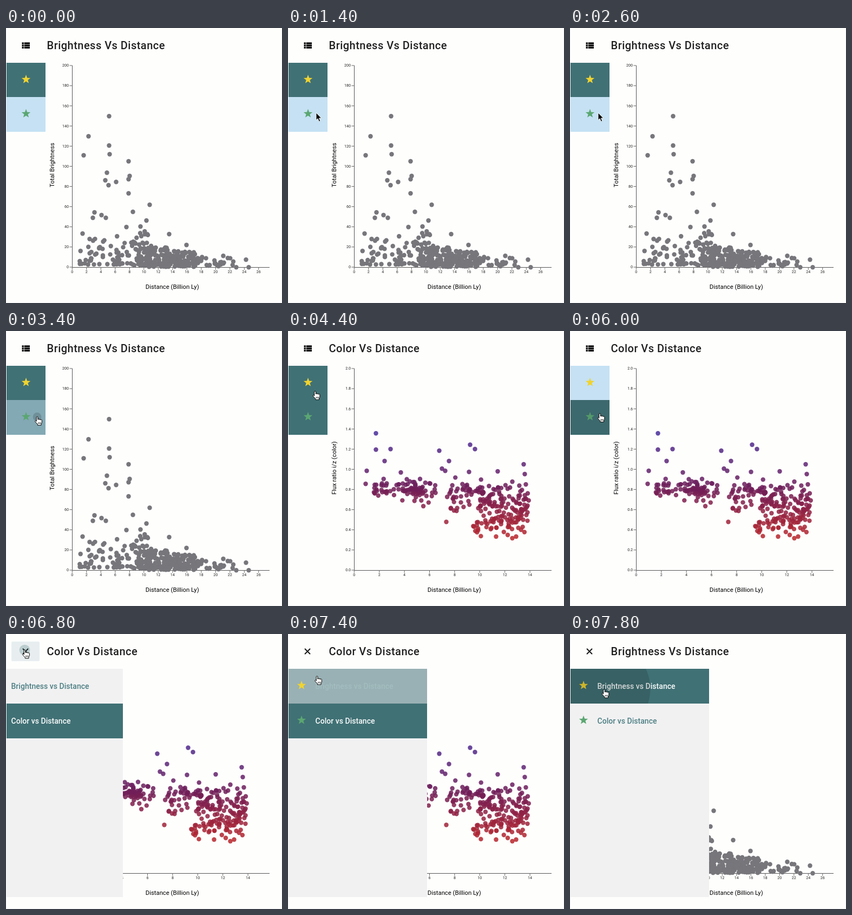
Write an HTML page that moves like this. It is 510x506 px and loops after 8 s.

```html
<!DOCTYPE html>
<html lang="en">
<head>
<meta charset="utf-8">
<title>Scatter charts</title>
<style>
  html, body { margin: 0; width: 100%; height: 100%; overflow: hidden; background: #fefefd; }
  #stage { display: block; font-family: Roboto, sans-serif; }
  .tick { font-size: 7.1px; fill: #222; }
  .label { font-size: 11.3px; fill: #000; }
  .title { font-size: 20px; font-weight: 500; letter-spacing: .47px; fill: #202020; }
  .row { font-size: 14px; font-weight: 500; letter-spacing: .03px; }
</style>
</head>
<body>
<svg id="stage" width="510" height="506" viewBox="0 0 510 506"></svg>
<script>
const LOOP = 8000, STEP = 200, FADE = 400, DRAWER_AT = 6660;
const TEAL = [64, 113, 117], SKY = [197, 225, 243], PANEL = [241, 241, 242];
const GOLD = '#f0d330', GREEN = '#5ba672';

const clamp = v => Math.min(1, Math.max(0, v));
const mix = (a, b, p) => a.map((v, i) => v + (b[i] - v) * p);
const rgb = c => `rgb(${c.map(Math.round)})`;

function seeded(seed) {
  return () => (seed = (seed * 16807) % 2147483647) / 2147483647;
}

// Linear interpolation over [position, ...values] keys
function track(keys, t) {
  const i = keys.findIndex(k => k[0] > t);
  if (i < 0) return keys[keys.length - 1].slice(1);
  if (!i) return keys[0].slice(1);
  const a = keys[i - 1], b = keys[i];
  return mix(a.slice(1), b.slice(1), (t - a[0]) / (b[0] - a[0]));
}

// Lone points are placed by hand, the crowd near the axis is seeded
function brightDots() {
  const rnd = seeded(4217);
  const dots = [
    [190, 162], [152, 199], [143, 234], [190, 216], [191, 232], [226, 245], [186, 266], [183, 280],
    [203, 283], [189, 289], [228, 272], [226, 278], [226, 304], [265, 325], [234, 338], [163, 339],
    [160, 349], [176, 344], [184, 349], [259, 354], [141, 378], [154, 388], [301, 379], [222, 366],
    [248, 365], [333, 399], [401, 419], [443, 426], [448, 440], [425, 440]];
  const heap = (n, left, right, base, height, power) => {
    for (let i = 0; i < n; i++)
      dots.push([left + (right - left) * rnd(), base - height * rnd() ** power]);
  };
  heap(58, 134, 232, 435, 52, 2);
  heap(46, 228, 268, 437, 64, 1.6);
  heap(100, 244, 304, 439, 36, 1.3);
  heap(85, 295, 350, 439, 29, 1.4);
  heap(30, 345, 420, 438, 17, 1.4);
  return dots;
}

function colorDots() {
  const rnd = seeded(9133);
  const dots = [
    [162, 188], [162, 218], [189, 217], [178, 239], [145, 257], [143, 281], [279, 220], [336, 209],
    [345, 217], [297, 239], [284, 253], [290, 257], [334, 259], [435, 245], [437, 263], [387, 258],
    [414, 277], [439, 282], [292, 351], [208, 260], [384, 378], [414, 381], [421, 378]];
  const bell = () => (rnd() + rnd() + rnd() - 1.5) / 1.5;
  const cloud = (n, x, width, y, height, slope = 0) => {
    for (let i = 0; i < n; i++) {
      const u = rnd() * 2 - 1;
      dots.push([x + width * u, y + slope * u + height * bell()]);
    }
  };
  cloud(56, 216, 58, 289, 32);
  cloud(34, 233, 17, 297, 34);
  cloud(38, 328, 36, 296, 36, 4);
  cloud(9, 314, 14, 323, 20);
  cloud(112, 397, 48, 316, 52, 8);
  cloud(48, 393, 52, 356, 32);
  return dots;
}

const shades = [[185, 72, 46, 155], [290, 112, 30, 88], [382, 186, 40, 44]];
const dotsSvg = (dots, fill) => dots.map(([x, y]) =>
  `<circle cx="${(x + .5).toFixed(1)}" cy="${(y + .3).toFixed(1)}" r="4.2" fill="${fill(y)}"/>`).join('');
const text = (cls, x, y, s, more = '') => `<text class="${cls}" x="${x}" y="${y}" ${more}>${s}</text>`;
const box = (x, y, w, h, more = '') => `<rect x="${x}" y="${y}" width="${w}" height="${h}" ${more}/>`;

function axes(xMax, xUnit, yStep, digits, yTitle) {
  let s = '<path d="M122.5 69V440.5H487" fill="none" stroke="#555"/>';
  for (let v = 0; v <= xMax; v += 2) {
    const x = 122.3 + v * xUnit;
    s += `<path d="M${x} 440v5" stroke="#666"/>` + text('tick', x, 451, v, 'text-anchor="middle"');
  }
  for (let i = 0; i <= 10; i++) {
    const y = 440 - i * 37.1;
    s += `<path d="M117.5 ${y}h5" stroke="#666"/>` +
      text('tick', 116, y + 2.3, (i * yStep).toFixed(digits), 'text-anchor="end"');
  }
  return s + text('label', 257.8, 480, 'Distance (Billion Ly)') +
    text('label', 0, 0, yTitle, 'text-anchor="middle" transform="translate(89 252) rotate(-90)"');
}

function star(x, y, fill) {
  let p = '';
  for (let i = 0; i < 10; i++) {
    const r = i % 2 ? 3.6 : 8.6, a = i * Math.PI / 5;
    p += `${(x + r * Math.sin(a)).toFixed(2)},${(y + .6 - r * Math.cos(a)).toFixed(2)} `;
  }
  return `<polygon points="${p}" fill="${fill}"/>`;
}

const listIcon = [26.5, 30.5, 34.5].map(y => box(29.5, y, 3.3, 3.2) + box(33.7, y, 10.3, 3.2)).join('');

// Areas that answer to the pointer: x, y, width, height
const areas = {
  tileA: [1, 64, 72, 63], tileB: [1, 127, 72, 64],
  rowA: [1, 64, 256, 64], rowB: [1, 128, 256, 64],
  button: [10, 14, 52, 36]
};
const area = (id, more = '') => box(...areas[id], `id="${id}" ${more}`);

stage.innerHTML = `
  ${box(0, 0, 510, 506, 'fill="#fefefd"')}
  <g id="bright">
    ${axes(26, 13.25, 20, 0, 'Total Brightness')}
    ${dotsSvg(brightDots(), () => '#77767b')}
    ${text('title', 75.6, 39, 'Brightness Vs Distance')}
  </g>
  <g id="color">
    ${axes(14, 23.2, .2, 1, 'Flux ratio i/z (color)')}
    <g fill-opacity=".86">${dotsSvg(colorDots(), y => rgb(track(shades, y)))}</g>
    ${text('title', 75.6, 39, 'Color Vs Distance')}
  </g>
  ${area('tileA')}${area('tileB')}
  ${star(37, 94, GOLD)}${star(37, 157, GREEN)}
  <g id="menu">
    ${box(1, 64, 256, 420, `fill="${rgb(PANEL)}"`)}
    ${area('rowA')}${area('rowB')}
    ${star(25, 94, GOLD)}${star(25, 158, GREEN)}
    ${text('row', 50.5, 101, 'Brightness vs Distance', 'id="textA"')}
    ${text('row', 50.5, 165, 'Color vs Distance', 'id="textB"')}
  </g>
  <path d="M.5 0V505.5H510M509.5 0V506" fill="none" stroke="#f5f5f5"/>
  ${area('button', 'rx="2" fill="#e8eef0"')}
  <g id="list">${listIcon}</g>
  <path id="cross" d="M31 27l10 10m0-10l-10 10" stroke="#111" stroke-width="1.8"/>
  <svg id="clip"><circle id="ripple"/></svg>
  <g id="pointer">
    <path id="arrow" d="M0 0V13.5L3.1 10.7L5.4 16.2L7.8 15.2L5.5 9.9H9.7Z"
      fill="#000" stroke="#fff" stroke-width=".9"/>
    <g id="hand" transform="translate(-4.5 0)" stroke="#000" stroke-linejoin="round">
      <path d="M3.2 9.4V2A1.35 1.35 0 0 1 5.9 2V6A1.25 1.25 0 0 1 8.4 6.3A1.25 1.25 0 0 1 10.9 6.8A1.2 1.2 0 0 1 13.3 7.6V11.3L12 14V16.3H5.3V14.5L.8 9.8A1.3 1.3 0 0 1 3.2 8.7Z" fill="#fff"/>
      <path d="M6.7 11v3m2-3v3m2-3v3" stroke-width=".8"/>
    </g>
  </g>`;

const $ = id => document.getElementById(id);
const set = (id, attrs) => { for (const k in attrs) $(id).setAttribute(k, attrs[k]); };
const show = (id, on) => set(id, { display: on ? 'inline' : 'none' });

// Pointer stops: time, x, y
const path = [[600, 285, 423], [1400, 52, 156], [2600, 52, 156], [3200, 57.5, 157], [3600, 57.5, 157],
  [4200, 50, 110], [4800, 50, 110], [5200, 53.5, 150], [6000, 55, 151], [6600, 34.5, 28.5],
  [7000, 34.5, 28.5], [7600, 63, 101]];
const presses = [[3390, 'tileB'], [4590, 'tileA'], [5590, 'tileB'], [6785, 'button'], [7590, 'rowA']];
// Spans in which each entry is hovered or selected
const spansA = [[-FADE, 3600], [4000, 5600], [7200, LOOP]];
const spansB = [[3200, 4600], [5160, 7400]];

const lit = (spans, t) => Math.max(...spans.map(([on, off]) =>
  clamp((t - on) / FADE) * (1 - clamp((t - off) / FADE))));

// cubic-bezier(.25, .8, .25, 1), solved by halving
function drawerEase(p) {
  const curve = (s, a, b) => 3 * a * (1 - s) ** 2 * s + 3 * b * (1 - s) * s * s + s ** 3;
  let lo = 0, hi = 1;
  for (let i = 0; i < 20; i++) {
    const mid = (lo + hi) / 2;
    if (curve(mid, .25, .25) < p) lo = mid; else hi = mid;
  }
  return curve(lo, .8, 1);
}

function drawRipple(t) {
  const press = presses.find(([at]) => t >= at && t < at + 600);
  show('clip', !!press);
  if (!press) return;
  const [at, id] = press, age = t - at;
  const [x, y, width, height] = areas[id], [cx, cy] = track(path, at);
  const onButton = id === 'button';
  set('clip', { x, y, width, height });
  set('ripple', {
    cx: cx - x, cy: cy - y + 1, r: 4 + age * .39,
    fill: onButton ? '#2d6468' : '#000',
    'fill-opacity': (onButton ? .24 : .15) * clamp((600 - age) / 400)
  });
}

function draw(t) {
  const bright = t < 3600 || (t >= 4600 && t < 5600) || t >= 7800;
  show('bright', bright);
  show('color', !bright);

  for (const [key, spans] of [['A', spansA], ['B', spansB]]) {
    const p = lit(spans, t);
    set('tile' + key, { fill: rgb(mix(SKY, TEAL, p)) });
    set('row' + key, { fill: rgb(mix(PANEL, TEAL, p)) });
    set('text' + key, { fill: rgb(mix([76, 126, 130], [250, 252, 252], p)) });
  }

  const open = t >= DRAWER_AT;
  show('menu', open);
  show('cross', open);
  show('list', !open);
  const hidden = 1 - drawerEase(clamp((t - DRAWER_AT) / 400));
  set('menu', { transform: `translate(${Math.round(-257 * hidden)} 0)` });

  const [x, y] = track(path, t), [bx, by, bw, bh] = areas.button;
  show('button', x > bx && x < bx + bw && y > by && y < by + bh);
  show('pointer', t >= path[0][0]);
  set('pointer', { transform: `translate(${x} ${y})` });
  show('arrow', t < 3200);
  show('hand', t >= 3200);
  drawRipple(t);
}

const begin = performance.now();
function frame() {
  const t = (performance.now() - begin) % LOOP;
  draw(Math.floor(t / STEP) * STEP);
  requestAnimationFrame(frame);
}
draw(0);
requestAnimationFrame(frame);
</script>
</body>
</html>
```
